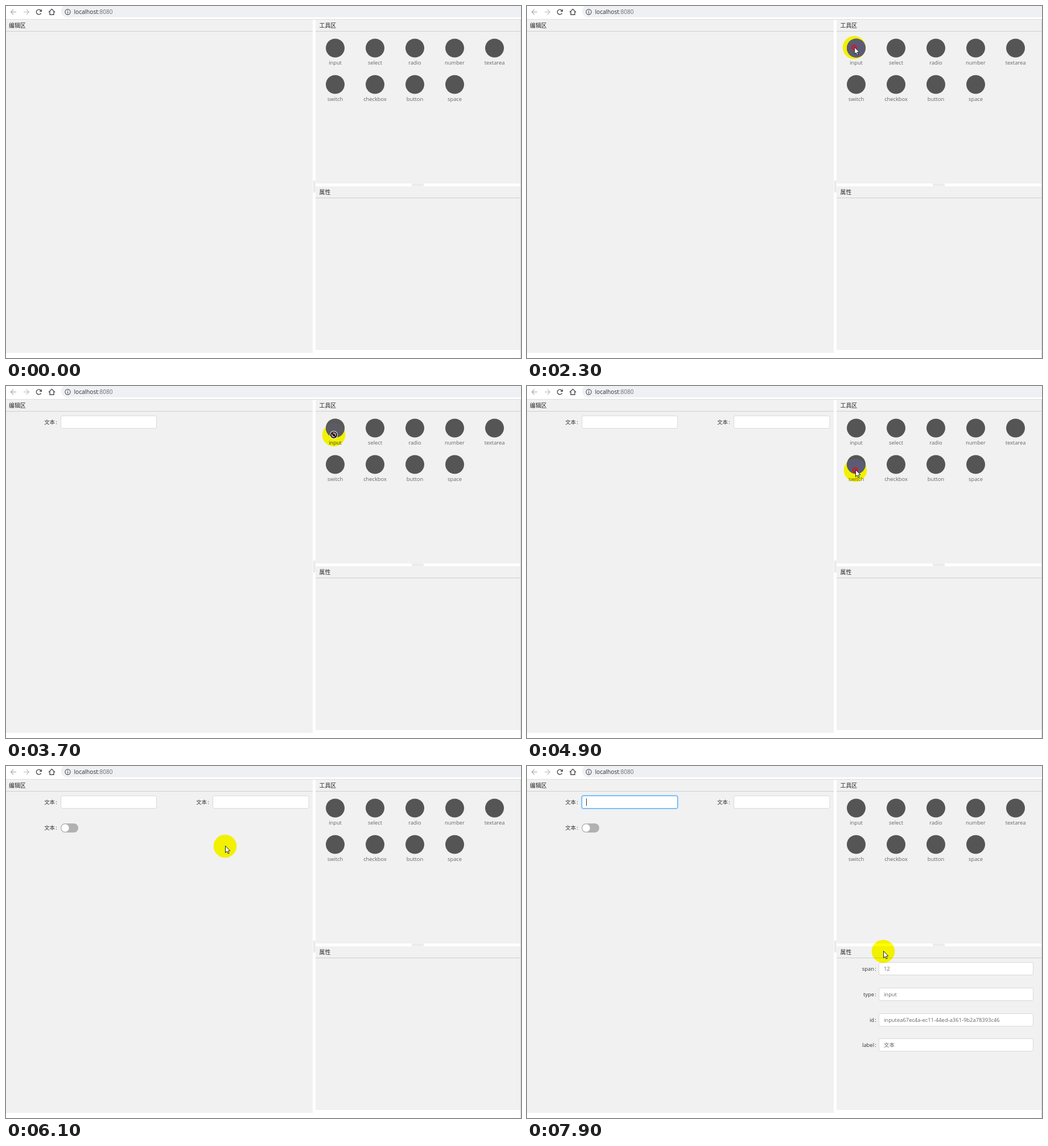
An HTML page with a canvas that plays this animation: 905x619 px, repeating every 8 s.

```html
<!DOCTYPE html>
<html lang="zh">
<head>
<meta charset="utf-8">
<title>Form designer</title>
<style>
  html, body { margin: 0; width: 100%; height: 100%; overflow: hidden; background: #fff; }
  canvas { display: block; width: 905px; height: 619px; }
</style>
</head>
<body>
<canvas id="stage" width="905" height="619"></canvas>
<script>
const ctx = document.getElementById('stage').getContext('2d');
const LOOP = 8000, STEP = 100, TAU = Math.PI * 2;
const FAMILY = '"Open Sans", "Noto Sans CJK SC", "Noto Sans CJK", sans-serif';
const DARK = '#4a4c50', PANEL = '#f1f1f1', RULE = '#cfcfcf';
const SHOW = 100, FOCUS = 7400;

const tools = ['input', 'select', 'radio', 'number', 'textarea', 'switch', 'checkbox', 'button', 'space']
  .map((name, i) => ({ name, x: 578.5 + (i % 5) * 70, y: i < 5 ? 74 : 138 }));

// Pointer moves: eased from the previous end, bowed downwards by `bow`
const home = { x: 535, y: 281 };
const moves = [
  { start: 1000, end: 1900, x: 557, y: 150 },
  { start: 1900, end: 2200, x: 575, y: 73 },
  { start: 2300, end: 2800, x: 176, y: 115, bow: 50 },
  { start: 2900, end: 3600, x: 576, y: 86 },
  { start: 3700, end: 4200, x: 276, y: 88 },
  { start: 4300, end: 4600, x: 605, y: 87 },
  { start: 4600, end: 4900, x: 577, y: 148 },
  { start: 4900, end: 5500, x: 179, y: 110 },
  { start: 5700, end: 6500, x: 591, y: 122, bow: 25 },
  { start: 6500, end: 6800, x: 574, y: 128 },
  { start: 6800, end: 7200, x: 95, y: 70 },
  { start: 7200, end: 7400, x: 165, y: 63 },
  { start: 7500, end: 7900, x: 626, y: 326 }
];

const drags = [
  { press: 2300, start: 2400, drop: 2900, tool: tools[0], top: 45 },
  { press: 3600, start: 3700, drop: 4300, tool: tools[0], top: 95 },
  { press: 4900, start: 5000, drop: 5700, tool: tools[5], top: 95 }
];
const [first, second, third] = drags.map(d => d.drop);

function pointer(t) {
  let from = home;
  for (const m of moves) {
    if (t <= m.start) break;
    if (t < m.end) {
      const k = (t - m.start) / (m.end - m.start), e = k * k * (3 - 2 * k);
      return {
        x: from.x + (m.x - from.x) * e,
        y: from.y + (m.y - from.y) * e + (m.bow || 0) * Math.sin(Math.PI * e)
      };
    }
    from = m;
  }
  return from;
}

function rect(x, y, w, h, color) {
  ctx.fillStyle = color;
  ctx.fillRect(x, y, w, h);
}

function pill(x, y, w, h, color) {
  ctx.fillStyle = color;
  ctx.beginPath();
  ctx.roundRect(x, y, w, h, h / 2);
  ctx.fill();
}

function disc(x, y, r, color) {
  ctx.fillStyle = color;
  ctx.beginPath();
  ctx.arc(x, y, r, 0, TAU);
  ctx.fill();
}

function ring(x, y, r, color, width, from = 0, to = TAU) {
  ctx.strokeStyle = color;
  ctx.lineWidth = width;
  ctx.beginPath();
  ctx.arc(x, y, r, from, to);
  ctx.stroke();
}

function line(color, width, ...pts) {
  ctx.strokeStyle = color;
  ctx.lineWidth = width;
  ctx.beginPath();
  pts.forEach(([x, y]) => ctx.lineTo(x, y));
  ctx.stroke();
}

function text(str, x, y, { size = 9.4, color = '#666', align = 'left' } = {}) {
  ctx.font = `${size}px ${FAMILY}`;
  ctx.fillStyle = color;
  ctx.textAlign = align;
  ctx.fillText(str, x, y);
}

function box(x, y, w, h, focused) {
  ctx.beginPath();
  ctx.roundRect(x + .5, y + .5, w - 1, h - 1, 2.5);
  if (focused) {
    ctx.strokeStyle = 'rgba(24,144,255,.25)';
    ctx.lineWidth = 3.5;
    ctx.stroke();
  }
  ctx.fillStyle = '#fff';
  ctx.fill();
  ctx.strokeStyle = focused ? '#40a9ff' : '#d9d9d9';
  ctx.lineWidth = 1;
  ctx.stroke();
}

function label(str, right, y) {
  text(str, right, y, { color: '#333', align: 'right' });
  text(':', right + 1.2, y, { color: '#333' });
}

function navArrow(x, dir, color) {
  const tip = x + 4.7 * dir;
  line(color, 1.2, [x - 4.7 * dir, 10.5], [tip, 10.5]);
  line(color, 1.2, [tip - 4.5 * dir, 6], [tip, 10.5], [tip - 4.5 * dir, 15]);
}

function browserBar() {
  rect(0, 0, 905, 619, '#fff');
  pill(97, -2, 830, 22, '#eef0f4');
  rect(0, 23, 905, 1, '#dcdcdc');
  navArrow(13.2, -1, '#a9abae');
  navArrow(35.7, 1, '#c0c2c4');

  ring(57.7, 10.5, 4.3, DARK, 1.5, .5, 5.5);
  ctx.fillStyle = DARK;
  ctx.beginPath();
  ctx.moveTo(63, 5.5);
  ctx.lineTo(63, 10);
  ctx.lineTo(58.5, 10);
  ctx.fill();

  line(DARK, 1.4, [75, 11], [80.5, 5.5], [86, 11]);
  line(DARK, 1.4, [77, 9.5], [77, 15.3], [84, 15.3], [84, 9.5]);
  ring(108.5, 10.5, 4.6, DARK, 1.1);
  rect(108, 9.8, 1.1, 3.4, DARK);
  rect(108, 7.6, 1.1, 1.2, DARK);

  text('localhost', 119.5, 14, { size: 10.1, color: '#2b2d30' });
  const w = ctx.measureText('localhost').width;
  text(':8080', 119.5 + w, 14, { size: 10.1, color: '#6a6d71' });
}

function panel(title, x, y, w, h, inset) {
  rect(x, y, w, h, PANEL);
  rect(x, y + 20, w, 1, RULE);
  text(title, x + inset, y + 13.8, { size: 9.9, color: '#222' });
}

function grips() {
  rect(540, 307, 4, 21, '#f6f6f6');
  rect(713, 312, 21, 5, '#f3f3f3');
  for (const i of [0, 2]) {
    rect(540 + i, 307, 1, 21, '#e0e0e0');
    rect(713, 313 + i, 21, 1, '#e4e4e4');
  }
}

function workspace() {
  panel('编辑区', 0, 24, 539, 586, 5);
  panel('工具区', 544, 24, 360, 288, 6.5);
  panel('属性', 544, 317, 360, 288, 6.5);
  rect(904, 24, 1, 595, '#d2d2d2');
  grips();
  for (const { name, x, y } of tools) {
    disc(x, y, 16.5, '#555');
    text(name, x, y + 29, { size: 9.3, align: 'center' });
  }
}

function form(t) {
  if (t >= first) {
    label('文本', 86, 67);
    box(96, 52, 169, 23, t >= FOCUS);
    if (t >= FOCUS) rect(104, 57, 1, 13, '#333');
  }
  if (t >= second) {
    label('文本', 353, 67);
    box(363, 52, 169.5, 23);
  }
  if (t >= third) {
    label('文本', 86, 112);
    pill(96, 101, 31, 16, '#b1b1b1');
    disc(104, 109, 6.7, '#fff');
  }
}

function properties() {
  const fields = {
    span: '12', type: 'input',
    id: 'inputea67ec4a-ec11-44ed-a361-9b2a78393c46', label: '文本'
  };
  Object.entries(fields).forEach(([name, value], i) => {
    const y = Math.round(345 + i * 44.8);
    label(name, 610, y + 15);
    box(618, y, 272, 23);
    text(value, 627, y + 15);
  });
}

function placeholder(top) {
  rect(0, top, 532, 66, '#f2f2f2');
  ctx.setLineDash([3, 2]);
  ctx.strokeStyle = '#e3e2de';
  ctx.lineWidth = 1;
  ctx.strokeRect(.5, top + .5, 531, 65);
  ctx.setLineDash([]);
  disc(264.5, top + 25, 16.5, '#e6e6e6');
}

function ghost({ tool, press }, p) {
  const grab = pointer(press);
  const x = p.x + tool.x - grab.x, y = p.y + tool.y - grab.y;
  ctx.globalAlpha = .7;
  disc(x, y, 16.5, '#5c5c5c');
  text(tool.name, x, y + 29, { size: 9.3, align: 'center' });
  ctx.globalAlpha = 1;
}

function highlight(p) {
  ctx.globalCompositeOperation = 'multiply';
  disc(p.x, p.y, 20.3, '#ffff00');
  ctx.globalCompositeOperation = 'source-over';
  ctx.save();
  ctx.beginPath();
  ctx.arc(p.x, p.y, 20.3, 0, TAU);
  ctx.clip();
  for (const { x, y } of tools) disc(x, y, 16.5, '#5b5b76');
  ctx.restore();
}

function arrow(x, y) {
  const pts = [[0, 0], [0, 12], [2.7, 9.5], [4.6, 13.7], [6.5, 12.9], [4.7, 8.8], [8.4, 8.6]];
  ctx.beginPath();
  pts.forEach(([dx, dy]) => ctx.lineTo(x + dx, y + dy));
  ctx.closePath();
  ctx.fillStyle = '#fff';
  ctx.fill();
  ctx.strokeStyle = '#222';
  ctx.lineWidth = 1;
  ctx.stroke();
}

function noDrop({ x, y }) {
  ring(x, y, 5, '#fff', 4);
  ring(x, y, 5, '#151515', 2.2);
  line('#151515', 2.2, [x - 3.5, y - 3.5], [x + 3.5, y + 3.5]);
}

function badge(x, y) {
  rect(x, y, 7, 5, '#fff');
  ctx.strokeStyle = '#555';
  ctx.lineWidth = 1;
  ctx.strokeRect(x - .5, y - .5, 7, 5);
}

function draw(t) {
  browserBar();
  workspace();
  form(t);
  if (t > FOCUS) properties();
  if (t < SHOW) return;

  const p = pointer(t);
  const held = drags.find(d => t >= d.press && t < d.drop);
  const moving = held && t >= held.start;
  const inEditor = p.x < 539 && p.y > 45;
  if (moving && inEditor) placeholder(held.top);
  highlight(p);
  if (moving) ghost(held, p);
  if (held || t === FOCUS) ring(p.x, p.y, 3.8, '#e0141e', 2.6);

  if (moving && !inEditor) return noDrop(p);
  arrow(p.x + .5, p.y - .5);
  if (moving) badge(p.x + 3, p.y + 11);
}

function tick() {
  const t = performance.now() % LOOP;
  draw(Math.floor(t / STEP) * STEP);
  requestAnimationFrame(tick);
}
tick();
</script>
</body>
</html>
```
